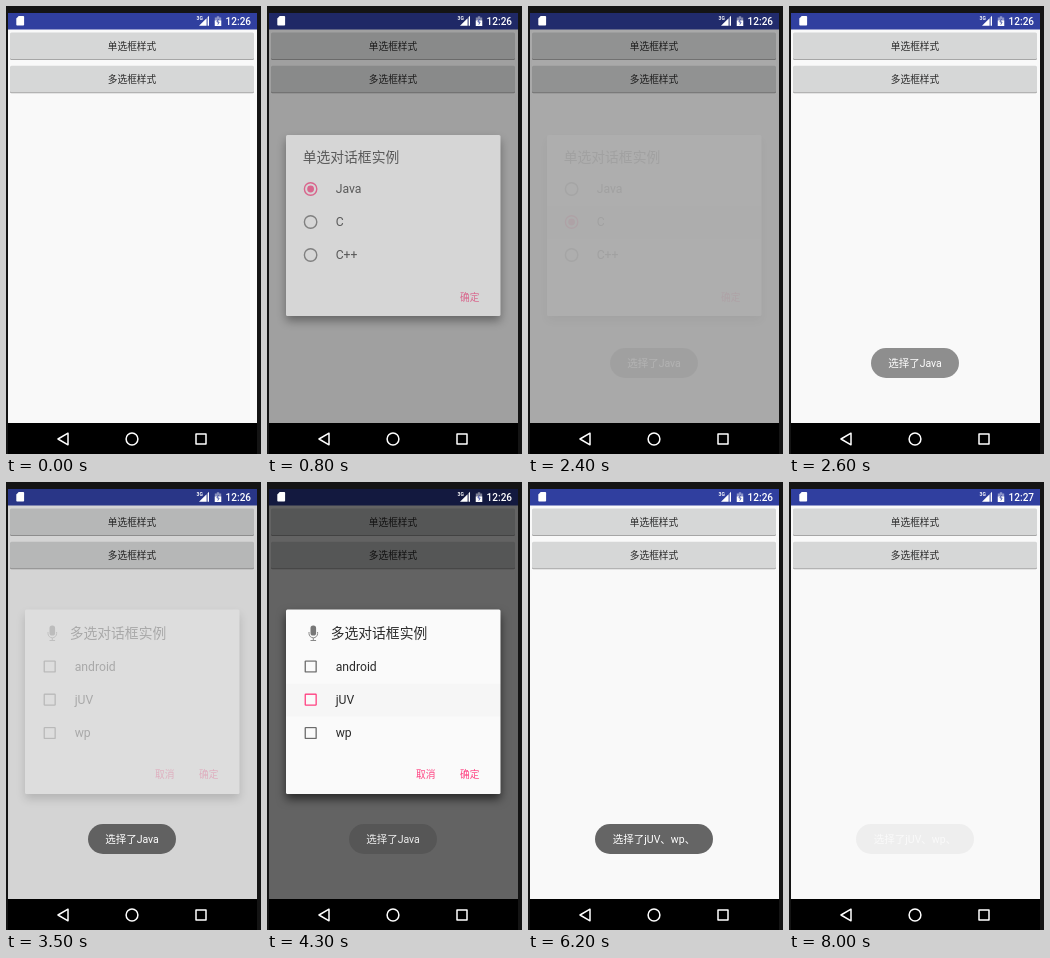
Recreate the animation shown at these times as an HTML page. Size 255 px wide and 448 px high, loop 8.1 s.

```html
<!DOCTYPE html>
<html lang="zh-CN">
<head>
<meta charset="utf-8">
<style>
html, body { margin: 0; width: 100%; height: 100%; overflow: hidden; background: #141414; }
svg { display: block; width: 100vw; height: 100vh; }
text { font-family: Roboto, 'Noto Sans CJK SC', 'Noto Sans CJK', sans-serif; }
.card { filter: drop-shadow(0 5px 5px #0009); }
.raised { filter: drop-shadow(0 1px .6px #0005); }
</style>
</head>
<body>
<svg id="stage" viewBox="0 0 255 448"></svg>
<script>
const PINK = '#ff4081', GREY = '#6b6b6b', PAPER = '#fafafa', INK = '#2b2b2b';
const LOOP = 81, STEP = 100;
const FADE_OUT = [.9, .6, .3, .07, 0];
const TOAST_IN = [.1, .4, .72, .88, 1];
const stage = document.getElementById('stage');

// Value of a stepped ramp at tick t; holds the last value afterwards.
const ramp = (t, start, values, before = 0) =>
  t < start ? before : values[Math.min(t - start, values.length - 1)];

const text = (s, x, y, size, fill = INK, extra = '') =>
  `<text x="${x}" y="${y}" font-size="${size}" fill="${fill}" ${extra}>${s}</text>`;
const rect = (x, y, w, h, fill, extra = '') =>
  `<rect x="${x}" y="${y}" width="${w}" height="${h}" fill="${fill}" ${extra}/>`;
const group = (opacity, body) => opacity > 0 ? `<g opacity="${opacity}">${body}</g>` : '';

const button = (label, y, pressed) =>
  rect(4, y, 244, 26.5, pressed ? '#c3c4c4' : '#d6d7d7', 'rx="1.5" class="raised"') +
  text(label, 126, y + 17.2, 9.7, INK, 'text-anchor="middle"');

function radio(y, p) {
  const color = p > .4 ? PINK : GREY;
  return `<circle cx="43.6" cy="${y}" r="6.2" fill="none" stroke="${color}" stroke-width="1.4"/>
    <circle cx="43.6" cy="${y}" r="${3.4 * p}" fill="${color}"/>`;
}

// p < 0: untouched; 0 to 1: border grows inwards, then the tick is drawn.
function checkbox(y, p) {
  const hole = 9.6 * Math.max(0, 1 - 2 * Math.max(p, 0));
  const tick = Math.max(0, 2 * p - 1);
  return rect(37.6, y - 6.1, 12.2, 12.2, p < 0 ? GREY : PINK, 'rx="1.2"') +
    rect(43.7 - hole / 2, y - hole / 2, hole, hole, PAPER) +
    (tick ? `<path d="M40.3 ${y}l2.6 2.7l4.7-5.2" fill="none" stroke="#fff" stroke-width="1.4"
      pathLength="1" stroke-dasharray="${tick} 2"/>` : '');
}

const item = (label, y) => text(label, 68.7, y + 4.4, 12.2);
const rowTint = (y, on) => on ? rect(19, y - 16, 214.5, 33, '#000', 'opacity=".015"') : '';
const card = (y, h) => rect(19, y, 214.5, h, PAPER, 'rx="1.5" class="card"');

function singleDialog(t) {
  const java = ramp(t, 15, [.7, .35, 0], 1);
  const c = ramp(t, 15, [0, .45, .8, 1]);
  return card(129, 181) + text('单选对话框实例', 35.7, 156.3, 13.8) +
    rowTint(216, t >= 15) +
    radio(183, java) + item('Java', 183) +
    radio(216, c) + item('C', 216) +
    radio(249, 0) + item('C++', 249) +
    text('确定', 193, 294.5, 9.7, PINK);
}

function multiDialog(t) {
  const second = ramp(t, 43, [0, .3, .6, .85, 1], -1);
  const third = ramp(t, 49, [0, .3, .6, .85, 1], -1);
  const mic = `<rect x="43.5" y="143.5" width="5.6" height="10" rx="2.6" fill="#777"/>
    <path d="M42 150v1.5a4.3 4.3 0 0 0 8.6 0V150M46.3 156v2.4M43.5 158.5h5.6"
      fill="none" stroke="#888"/>`;
  return card(127.5, 184.5) + mic + text('多选对话框实例', 63.7, 156.3, 13.8) +
    rowTint(217.7, t >= 43 && t < 48) + rowTint(251, t >= 48) +
    checkbox(184.5, -1) + item('android', 184.5) +
    checkbox(217.7, second) + item('jUV', 217.7) +
    checkbox(251, third) + item('wp', 251) +
    text('取消', 149, 296.3, 9.7, PINK) + text('确定', 193, 296.3, 9.7, PINK);
}

const toast = (label, x, w) =>
  rect(x, 342, w, 30, '#545454', 'rx="15" fill-opacity=".89"') +
  text(label, x + w / 2, 360.8, 10.5, '#fff', 'text-anchor="middle"');

function statusIcons(t) {
  return `<g fill="#fff">
    <path d="M12.7 10h4.6q.8 0 .8.8v8q0 .8-.8.8h-6.2q-.8 0-.8-.8v-6.3z"/>
    <path d="M193 19.8l7.6-7.6v7.6zM201.6 11.2l1.4-1.4v10h-1.4z"/>
    <path d="M210.8 10.2h2.4v1.2h2v8.6h-6.4v-8.6h2z" fill-opacity=".45"/>
    <path d="M208.8 14.5h6.4V20h-6.4z"/></g>
    <path d="M212.5 13l-1.6 3h2.2l-1.3 2.6" fill="none" stroke="#303f9f" stroke-width=".8"/>` +
    text('3G', 190.6, 14.2, 5, '#fff', 'font-weight="700"') +
    text(t < 74 ? '12:26' : '12:27', 245, 19, 10, '#fff', 'font-weight="500" text-anchor="end"');
}

const navBar = rect(2, 417, 249, 31, '#000') +
  `<g fill="none" stroke="#fff" stroke-width="1.5" stroke-linejoin="round">
    <path d="M52 433l10-5.8v11.6z"/><circle cx="126" cy="433" r="5.9"/>
    <rect x="190" y="428" width="10" height="10"/></g>`;

function draw(t) {
  const fadeScrim = [.32, .1, 0], fadeCard = [.06, 0];
  const single = t < 24 ? ramp(t, 8, [.6, 1]) : ramp(t, 24, fadeCard);
  const multi = t < 58 ? ramp(t, 35, [.25, .75, 1]) : ramp(t, 58, fadeCard);
  const scrim = t < 24 ? .6 * single
    : t < 35 ? ramp(t, 24, fadeScrim)
    : t < 58 ? .6 * multi
    : ramp(t, 58, fadeScrim);
  const firstToast = t < 43 ? ramp(t, 24, TOAST_IN) : ramp(t, 43, FADE_OUT);
  const secondToast = t < 77 ? ramp(t, 58, TOAST_IN) : ramp(t, 77, FADE_OUT);

  stage.innerHTML =
    rect(0, 0, 255, 448, '#141414') +
    rect(2, 7, 249, 410, '#f9f9f9') +
    rect(2, 7, 249, 16.5, '#303f9f') +
    button('单选框样式', 26.5, t >= 6 && t < 8) +
    button('多选框样式', 59.7, t >= 33 && t < 35) +
    rect(2, 7, 249, 410, '#000', `opacity="${scrim}"`) +
    statusIcons(t) + navBar +
    group(single, singleDialog(t)) +
    group(multi, multiDialog(t)) +
    group(firstToast, toast('选择了Java', 82, 88)) +
    group(secondToast, toast('选择了jUV、wp、', 67, 118));
}

let shown = -1;
function tick() {
  const t = Math.floor(performance.now() / STEP) % LOOP;
  if (t !== shown) draw(shown = t);
  requestAnimationFrame(tick);
}
tick();
</script>
</body>
</html>
```
